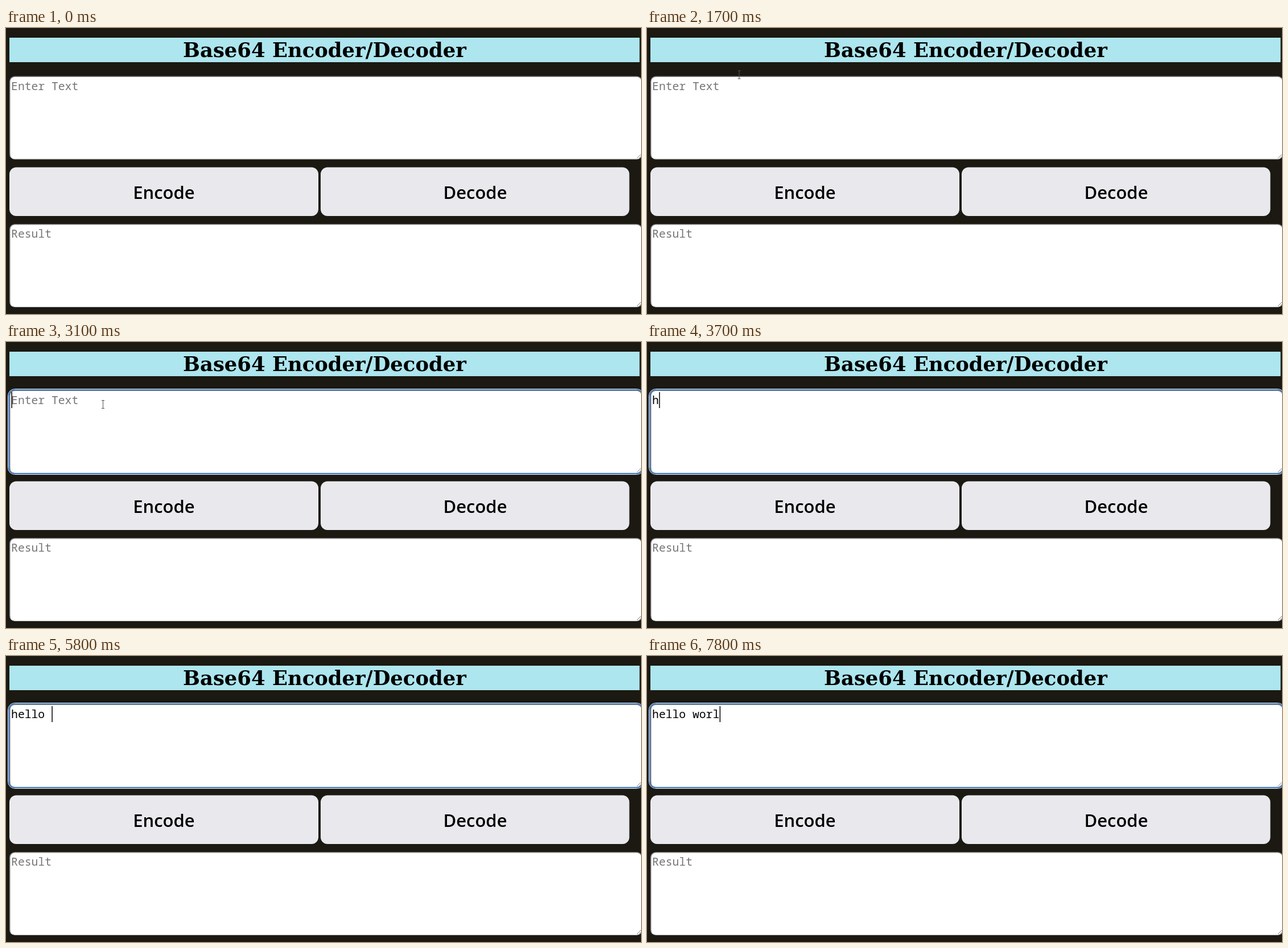
An HTML page for the animation above (8 s loop, 1116x502 px).

```html
<!DOCTYPE html>
<html lang="en">
<head>
<meta charset="utf-8">
<title>Base64 Encoder/Decoder</title>
<style>
  html, body { margin: 0; width: 100%; height: 100%; overflow: hidden; background: #1b1912; }
  svg { display: block; }
  .title { font: bold 35.4px "DejaVu Serif", serif; text-anchor: middle; }
  .label { font: 600 31px "Open Sans", "Noto Sans", sans-serif; text-anchor: middle; }
  .mono { font: 19.7px "Noto Sans Mono", monospace; }
  .hint { fill: #757575; }
</style>
</head>
<body>
<svg width="1116" height="502" viewBox="0 0 1116 502">
  <defs>
    <linearGradient id="bevel" x2="0" y2="1">
      <stop offset=".94" stop-color="#858585"/>
      <stop offset=".98" stop-color="#e2e2e2"/>
    </linearGradient>
    <g id="area">
      <rect x="6" width="1112" height="146" rx="9.5" fill="url(#bevel)"/>
      <rect x="7.5" y="1.5" width="1109" height="143" rx="8" fill="#fff"/>
      <path d="M1109 144L1116 137M1113 144L1116 141" stroke="#777"/>
    </g>
  </defs>

  <rect x="6" y="17" width="1107.5" height="43" fill="#ade6ee"/>
  <text class="title" x="560" y="51">Base64 Encoder/Decoder</text>

  <use href="#area" y="84.5"/>
  <use href="#area" y="344"/>
  <g id="focus" fill="none">
    <rect x="3.5" y="82.5" width="1117" height="150" rx="12" stroke="#f4f8fc"/>
    <rect x="5" y="84" width="1114" height="147" rx="10.5" stroke="#3f78c4" stroke-width="2"/>
  </g>
  <text class="mono hint" x="9.1" y="368.3">Result</text>
  <text class="mono" id="entry" x="9.1" y="109"></text>
  <rect id="caret" y="88" width="1.5" height="28"/>

  <g fill="#e9e9ed">
    <rect x="6" y="244.5" width="543" height="85.5" rx="12"/>
    <rect x="553" y="244.5" width="542.5" height="85.5" rx="12"/>
  </g>
  <text class="label" x="277.5" y="300">Encode</text>
  <text class="label" x="824.5" y="300">Decode</text>

  <path id="arrow" d="M0 0V14L3.2 11.6L5.2 15.8L7.6 14.8L5.8 10.6L9.2 9.8Z"
        fill="#454545" stroke="#f4f4f4" stroke-width="1.4" paint-order="stroke"/>
  <path id="beam" d="M-2.5 -7H2.5M0 -7V7M-2.5 7H2.5" fill="none" stroke="#555"/>
</svg>
<script>
const LOOP = 8000, STEP = 100, FOCUS = 3100, FIELD_TOP = 80, CHAR_WIDTH = 11.82;

// The pointer glides between these points: [time, x, y]
const glide = [[1100, 105, -4], [1400, 150, 37], [1800, 166, 97], [2100, 166, 97], [2400, 170.5, 109.5]];
// Keystrokes appear in bursts at these times
const bursts = { 3700: "h", 5000: "e", 5400: "ll", 5800: "o ", 6600: "w", 6800: "o", 7200: "r", 7800: "l" };

const [focusRing, entry, caret, arrow, beam] =
  ["focus", "entry", "caret", "arrow", "beam"].map(id => document.getElementById(id));
const show = (el, visible) => el.setAttribute("visibility", visible ? "visible" : "hidden");

function pointerAt(t) {
  const next = glide.findIndex(([time]) => time > t);
  if (next === 0) return null;
  if (next < 0) return glide.at(-1).slice(1);
  const [t0, ...from] = glide[next - 1], [t1, ...to] = glide[next];
  return from.map((v, i) => v + (to[i] - v) * (t - t0) / (t1 - t0));
}

const typedBy = t => Object.keys(bursts).filter(time => time <= t).map(time => bursts[time]).join("");

function draw(t) {
  const typed = typedBy(t);
  const pointer = typed ? null : pointerAt(Math.floor(t / STEP) * STEP);
  const inField = pointer && pointer[1] >= FIELD_TOP;

  show(focusRing, t >= FOCUS);
  show(caret, t >= FOCUS);
  caret.setAttribute("x", 9.4 + typed.length * CHAR_WIDTH);
  entry.textContent = typed || "Enter Text";
  entry.classList.toggle("hint", !typed);

  show(arrow, pointer && !inField);
  show(beam, inField);
  if (pointer) (inField ? beam : arrow).setAttribute("transform", `translate(${pointer})`);
}

function tick() {
  draw(performance.now() % LOOP);
  requestAnimationFrame(tick);
}
tick();
</script>
</body>
</html>
```
